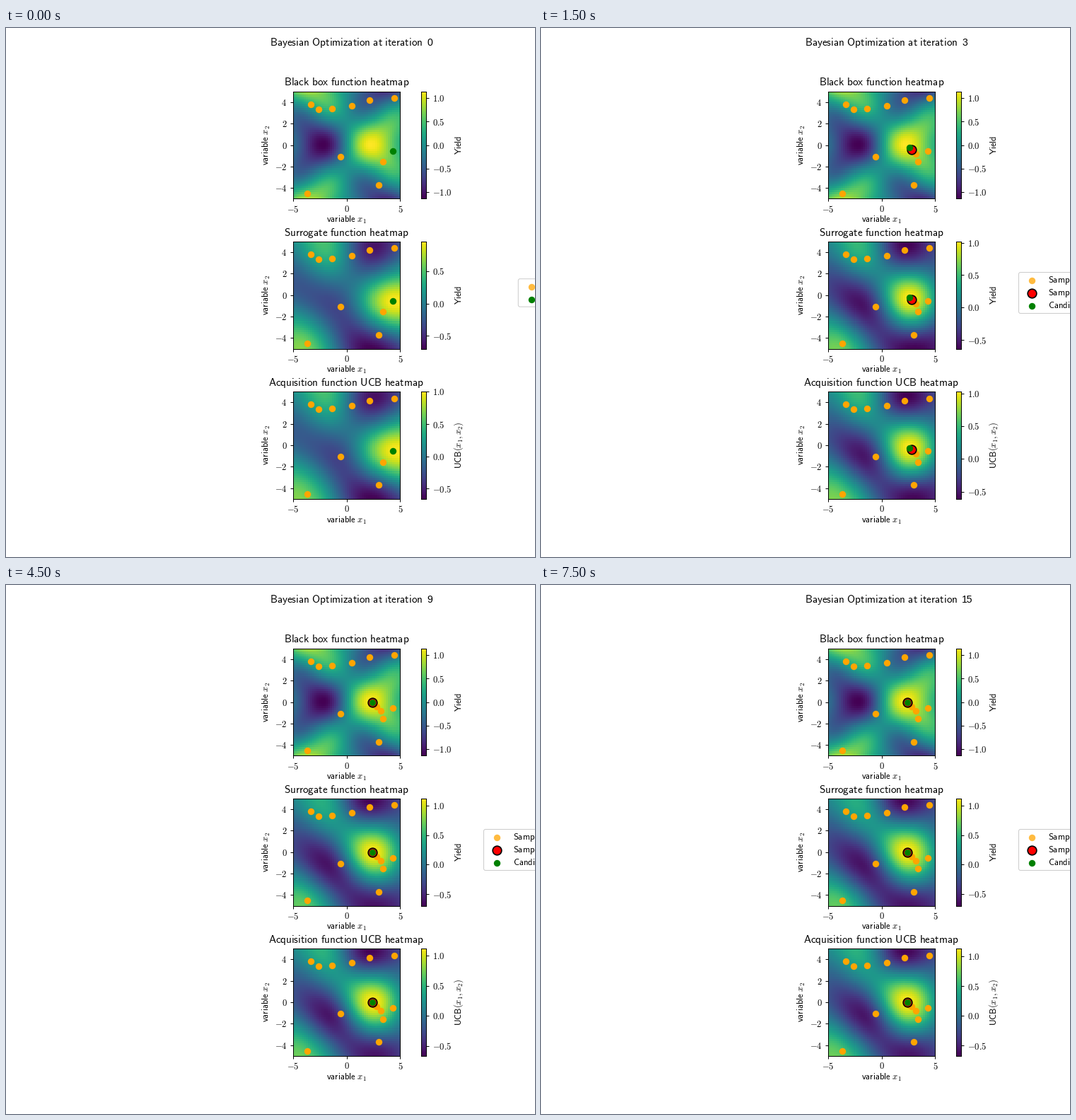
A matplotlib script for the animation above (8000 ms loop, 748 by 748 pixels).

```python
import numpy as np
import matplotlib.pyplot as plt
from matplotlib.animation import FuncAnimation
from matplotlib.patches import FancyBboxPatch

SIZE, DPI = 748, 88
PX = 72 / DPI  # points per pixel
BIG, SMALL = 15.1 * PX, 12.6 * PX
STEPS = 16
NOISE, KAPPA = 0.01, 0.1

# Subplot layout: three square panels, 0.4 panel heights apart
SIDE = 0.77 * SIZE / 3.8
TOPS = 0.12 * SIZE + 1.4 * SIDE * np.arange(3)
LEFT, BAR = 405.9, 586.7

plt.rcParams.update({"mathtext.fontset": "cm", "font.size": SMALL})


def black_box(x, y):
    return np.sin(x / 2) * np.cos(y / 2) + 0.3 * np.sin(x) * np.cos(y)


START = np.array([(-3.32, 3.82), (-2.62, 3.33), (-1.34, 3.43), (0.51, 3.69),
                  (2.13, 4.18), (4.41, 4.38), (-0.58, -1.06), (3.36, -1.56),
                  (2.99, -3.73), (-3.68, -4.53)])


def candidate(n):
    """Two wide guesses, then a slow approach to the maximum."""
    if n < 2:
        return [(4.34, -0.55), (3.17, -0.82)][n]
    return 2.3 + 0.5 / (n - 1) ** 0.7, -0.43 * 0.55 ** (n - 2)


PICKS = np.array([candidate(n) for n in range(STEPS)])

axis = np.linspace(-5, 5, 50)
GX, GY = np.meshgrid(axis, axis)
GRID = np.column_stack([GX.ravel(), GY.ravel()])


def kernel(a, b, length):
    d2 = ((a[:, None] - b[None]) ** 2).sum(-1)
    return np.exp(-d2 / (2 * length ** 2))


def gram(pts, length):
    return kernel(pts, pts, length) + NOISE * np.eye(len(pts))


def likelihood(pts, y, length):
    k = gram(pts, length)
    return -y @ np.linalg.solve(k, y) - np.linalg.slogdet(k)[1]


def posterior(pts):
    """Gaussian process mean and upper confidence bound on the grid."""
    y = black_box(*pts.T)
    length = max(np.linspace(1.8, 3, 25), key=lambda v: likelihood(pts, y, v))
    k, ks = gram(pts, length), kernel(GRID, pts, length)
    mean = ks @ np.linalg.solve(k, y)
    var = 1 - (ks * np.linalg.solve(k, ks.T).T).sum(1)
    ucb = mean + KAPPA * np.sqrt(np.clip(var, 0, None))
    return mean.reshape(GX.shape), ucb.reshape(GX.shape)


fig = plt.figure(figsize=(SIZE / DPI, SIZE / DPI), dpi=DPI, facecolor="white")


def add_axes(x, y, w, h, **kw):
    return fig.add_axes([x / SIZE, 1 - (y + h) / SIZE, w / SIZE, h / SIZE],
                        **kw)


stage = add_axes(0, 0, SIZE, SIZE, zorder=5)
stage.set(xlim=(0, SIZE), ylim=(SIZE, 0))
stage.axis("off")


def sans(s):
    return r"\mathsf{" + s.replace(" ", r"\ ") + "}"


def label(x, y, tex, size=SMALL, ha="center", rotation=0):
    return stage.text(x, y, f"${tex}$", size=size, ha=ha, va="baseline",
                      rotation=rotation, rotation_mode="anchor")


def dots(ax, kind, x=(), y=(), **kw):
    style = {
        "sample": dict(color="orange", ms=9.4 * PX, mew=0),
        "last": dict(mfc="red", mec="black", ms=12.6 * PX, mew=1.7 * PX),
        "pick": dict(color="green", ms=9.4 * PX, mew=0),
    }[kind]
    return ax.plot(x, y, "o", **style, **kw)[0]


class Panel:
    def __init__(self, top, title, unit):
        bottom, mid = top + SIDE, top + SIDE / 2
        self.ax = add_axes(LEFT, top, SIDE, SIDE)
        self.im = self.ax.imshow(np.zeros_like(GX), origin="lower",
                                 extent=(-5, 5, -5, 5), aspect="auto",
                                 interpolation="nearest")
        self.sample, self.last, self.pick = (
            dots(self.ax, k) for k in ("sample", "last", "pick"))
        self.ax.set(xlim=(-5, 5), ylim=(-5, 5))
        for set_ticks, values in ((self.ax.set_xticks, (-5, 0, 5)),
                                  (self.ax.set_yticks, range(-4, 5, 2))):
            set_ticks(values, [f"${v}$" for v in values])

        self.bar = add_axes(BAR, top, SIDE / 20, SIDE)
        self.ramp = self.bar.imshow(np.linspace(0, 1, 256)[:, None],
                                    origin="lower", aspect="auto")
        self.bar.set_xticks([])
        self.bar.yaxis.tick_right()

        label(481.3, top - 8.3, sans(title), BIG)
        label(481.5, bottom + 33.8, sans("variable ") + "x_1")
        label(371.8, mid, sans("variable ") + "x_2", rotation=90)
        label(643.7, mid, unit, rotation=90)

    def show(self, values, n):
        lo, hi = values.min(), values.max()
        self.im.set_data(values)
        self.im.set_clim(lo, hi)
        self.ramp.set_extent((0, 1, lo, hi))
        self.bar.set_ylim(lo, hi)
        ticks = [t for t in np.arange(-1, 1.1, 0.5) if lo <= t <= hi]
        self.bar.set_yticks(ticks, [f"${t:.1f}$" for t in ticks])
        last = max(n - 1, 0)
        self.sample.set_data(*np.vstack([START, PICKS[:last]]).T)
        self.last.set_data(*PICKS[last:n].T)
        self.pick.set_data(*PICKS[n:n + 1].T)


def legend(x, y, height, rows):
    box = FancyBboxPatch((x, y), 180, height, fc="white", ec="0.8", lw=PX,
                         boxstyle="round,pad=0,rounding_size=2.5")
    parts = [stage.add_patch(box)]
    for i, (kind, name) in enumerate(rows):
        row = y + 11 + 18.1 * i
        alpha = 0.75 if kind == "sample" else 1
        parts.append(dots(stage, kind, [x + 18.7], [row], alpha=alpha))
        parts.append(label(x + 41.5, row + 3.6, sans(name), ha="left"))
    return parts


titles = ["Black box function heatmap", "Surrogate function heatmap",
          "Acquisition function UCB heatmap"]
units = [sans("Yield"), sans("Yield"), sans("UCB(") + "x_1,x_2" + sans(")")]
panels = [Panel(*args) for args in zip(TOPS, titles, units)]

label(373, 25, sans("Bayesian Optimization at iteration"), BIG, ha="left")
counter = stage.text(595.3, 25, "0", size=14 * PX, family="Liberation Sans",
                     va="baseline")

sampled, chosen = ("sample", "Sampled points"), ("pick", "Candidate point")
first_legend = legend(724.3, 354.7, 39.5, [sampled, chosen])
full_legend = legend(675.5, 345.5, 58,
                     [sampled, ("last", "Sampled last"), chosen])
truth = black_box(GX, GY)


def update(n):
    maps = truth, *posterior(np.vstack([START, PICKS[:n]]))
    for panel, values in zip(panels, maps):
        panel.show(values, n)
    counter.set_text(str(n))
    for part in first_legend:
        part.set_visible(n == 0)
    for part in full_legend:
        part.set_visible(n > 0)
    return []


anim = FuncAnimation(fig, update, frames=STEPS, interval=500,
                     init_func=lambda: update(0), repeat=True, repeat_delay=0)
plt.show()
```
